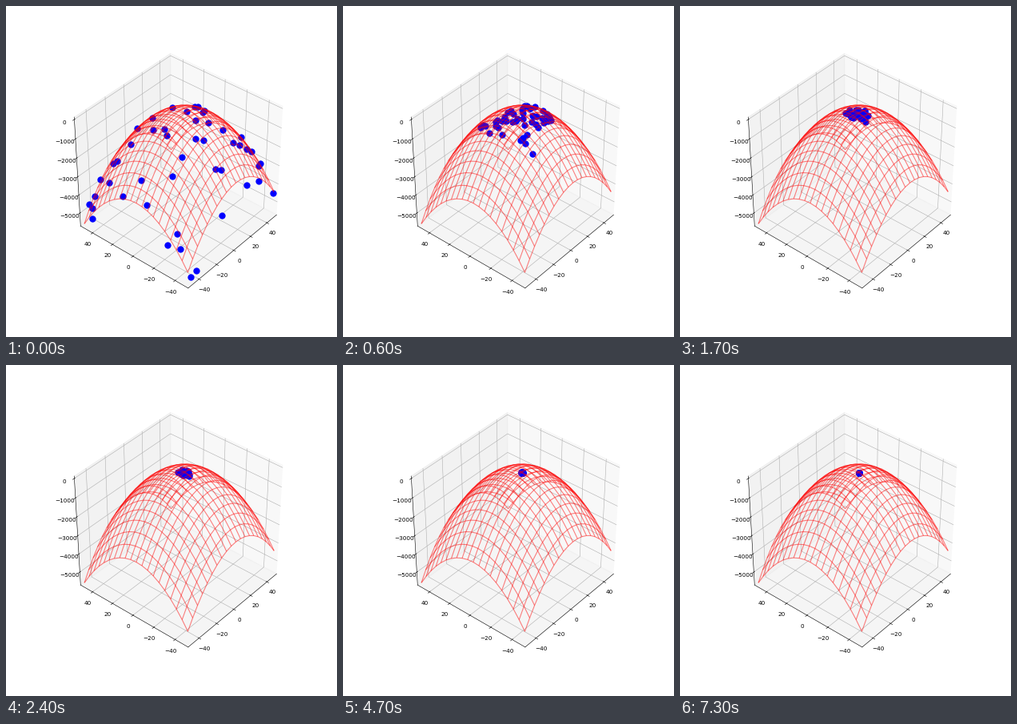
Write a matplotlib script that moves like this. It is 414 by 414 pixels and loops after 8000 ms.

```python
import numpy as np
import matplotlib.pyplot as plt
from matplotlib.animation import FuncAnimation

SIZE, STEP, FRAMES, LAST = 414, 100, 80, 73
PEAK = np.array([3, -3])
HALF = 50
COUNT = 48
Z_SCALE = 0.967

rng = np.random.default_rng(11)
start = rng.uniform(-1.12 * HALF, 1.12 * HALF, (COUNT, 2)) - PEAK
rate = rng.uniform(0.85, 1.4, COUNT)
turn = rng.normal(0, 0.6, COUNT)


def height(x, y):
    return -(x - PEAK[0]) ** 2 - (y - PEAK[1]) ** 2


def swarm(i):
    """Particles spiral over the surface towards its peak."""
    t = min(i, LAST) * STEP / 1000
    spread = np.exp(-1.5 * rate * t ** 0.8)
    a = turn * t
    x = PEAK[0] + spread * (start[:, 0] * np.cos(a) - start[:, 1] * np.sin(a))
    y = PEAK[1] + spread * (start[:, 0] * np.sin(a) + start[:, 1] * np.cos(a))
    return x, y, height(x, y)


fig = plt.figure(figsize=(8, 8), dpi=SIZE / 8)
ax = fig.add_axes([0.125, 0.116, 0.775, 0.77], projection="3d",
                  computed_zorder=False)
ax.view_init(38.5, 220)
ax.set_box_aspect((1, 1, Z_SCALE), zoom=0.5466 * np.sqrt(2 + Z_SCALE ** 2))

side = np.linspace(-HALF, HALF, 20)
X, Y = np.meshgrid(side, side)
Z = height(X, Y)
ax.plot_wireframe(X, Y, Z, color="red", alpha=0.5, linewidth=1.5, zorder=3)
dots, = ax.plot(*swarm(0), "o", color="blue", markersize=10,
                markeredgewidth=1.5, zorder=2)

# Limits sit 1/48 of the range outside the surface
for set_lim, data in ((ax.set_xlim, X), (ax.set_ylim, Y), (ax.set_zlim, Z)):
    pad = np.ptp(data) / 48
    set_lim(data.min() - pad, data.max() + pad)
ax.set_xticks(range(-40, 41, 20))
ax.set_yticks(range(-40, 41, 20))
ax.set_zticks(range(-5000, 1, 1000))


def draw(i):
    dots.set_data_3d(*swarm(i))
    return dots,


anim = FuncAnimation(fig, draw, frames=FRAMES, interval=STEP, repeat=True,
                     repeat_delay=0, blit=False)
plt.show()
```
